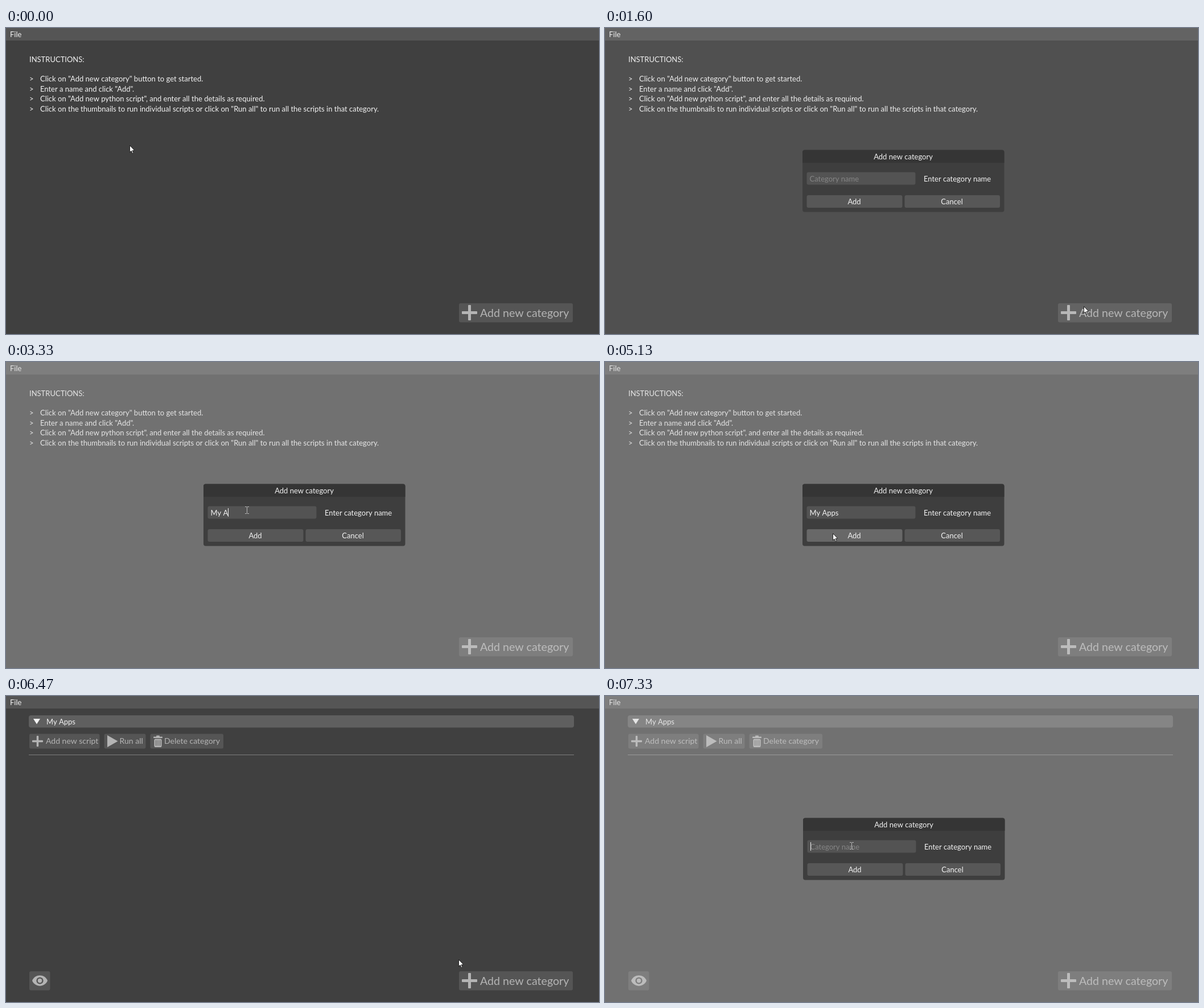
These frames come from a looping animation (1042 by 538 pixels, 8000 ms). An HTML page with a canvas:

```html
<!DOCTYPE html>
<html lang="en">
<head>
<meta charset="utf-8">
<title>Script launcher</title>
<style>
html, body { margin: 0; width: 100%; height: 100%; overflow: hidden; background: #404040; }
canvas { display: block; width: 100%; height: 100%; }
</style>
</head>
<body>
<canvas id="stage" width="1042" height="538"></canvas>
<script>
const ctx = document.getElementById('stage').getContext('2d');
const LOOP = 8000;
const FONT = 'Lato, "Open Sans", sans-serif';
const INK = '#f2f2f2', ICON = '#b4b4b4', BUTTON = '#555555';

const STEPS = [
  'Click on "Add new category" button to get started.',
  'Enter a name and click "Add".',
  'Click on "Add new python script", and enter all the details as required.',
  'Click on the thumbnails to run individual scripts or click on "Run all" to run all the scripts in that category.'
];

// Times below are in ticks of 1/15 s.
const OPEN_1 = 24, PRESS = 76, ADDED = 78, EYE = 79, OPEN_2 = 99;
const TYPED = [[43, 'M'], [45, 'My'], [47, 'My '], [50, 'My A'], [57, 'My Ap'], [59, 'My App'], [61, 'My Apps']];
const CARETS = [[33, 72], [110, 120]];

const smooth = p => p * p * (3 - 2 * p);
const easeOut = p => 1 - (1 - p) ** 2;
const linear = p => p;

// start, end, target x, target y, easing
const MOVES = [
  [0, 3, 460, 297, easeOut],
  [9, 17, 841, 489, smooth],
  [24, 29, 422, 261, smooth],
  [32, 33, 423, 260, linear],
  [68, 72, 400, 301, smooth],
  [86, 94, 862, 493, smooth],
  [96, 99, 661, 403, linear],
  [99, 109, 433, 263, easeOut]
];

function pointerAt(k) {
  let x = 217, y = 206;
  for (const [from, to, tx, ty, ease] of MOVES) {
    if (k <= from) break;
    const p = ease(Math.min(1, (k - from) / (to - from)));
    x += (tx - x) * p;
    y += (ty - y) * p;
  }
  return { x: Math.round(x), y: Math.round(y) };
}

function box(x, y, w, h, color, r = 3) {
  ctx.fillStyle = color;
  ctx.beginPath();
  ctx.roundRect(x, y, w, h, r);
  ctx.fill();
}

function poly(points, color) {
  ctx.fillStyle = color;
  ctx.beginPath();
  points.forEach(([x, y]) => ctx.lineTo(x, y));
  ctx.closePath();
  ctx.fill();
}

function label(str, x, y, { size = 13, color = INK, align = 'left', weight = 400 } = {}) {
  ctx.font = `${weight} ${size}px ${FONT}`;
  ctx.textAlign = align;
  ctx.fillStyle = color;
  ctx.fillText(str, x, y);
}

function plus(cx, cy, size, thick) {
  box(cx - size / 2, cy - thick / 2, size, thick, ICON, 1);
  box(cx - thick / 2, cy - size / 2, thick, size, ICON, 1);
}

function trash(x, y) {
  box(x + 5, y, 6, 3, ICON, 1);
  box(x, y + 2, 16, 2.5, ICON, 1);
  box(x + 1.5, y + 6, 13, 14.5, ICON, 2);
  for (let i = 0; i < 3; i++) box(x + 4 + i * 3.5, y + 8, 1.2, 10, BUTTON, 0);
}

function eye(cx, cy) {
  ctx.fillStyle = ICON;
  ctx.beginPath();
  ctx.moveTo(cx - 13.5, cy);
  ctx.bezierCurveTo(cx - 8.5, cy - 12.2, cx + 8.5, cy - 12.2, cx + 13.5, cy);
  ctx.bezierCurveTo(cx + 8.5, cy + 12.2, cx - 8.5, cy + 12.2, cx - 13.5, cy);
  ctx.fill();
  for (const [r, color] of [[6.1, BUTTON], [3.7, ICON]]) {
    ctx.fillStyle = color;
    ctx.beginPath();
    ctx.arc(cx, cy, r, 0, 7);
    ctx.fill();
  }
}

function instructions() {
  label('INSTRUCTIONS:', 41, 60);
  STEPS.forEach((line, i) => {
    const y = Math.round(94 + i * 17.6);
    label('>', 41, y);
    label(line, 60, y);
  });
}

function category() {
  const style = { size: 14, color: ICON };
  box(40, 34, 958, 21.5, '#5f5f5f', 4);
  poly([[48, 40], [60, 40], [54, 49.5]], INK);
  label('My Apps', 71, 50);
  box(41, 66.5, 123.5, 26, BUTTON);
  plus(55.5, 79.5, 19, 3.5);
  label('Add new script', 70, 84, style);
  box(172.5, 66.5, 73, 26, BUTTON);
  poly([[178, 69], [196.5, 79.5], [178, 90]], ICON);
  label('Run all', 199.5, 84, style);
  box(253.5, 66.5, 128.5, 26, BUTTON);
  trash(259, 69.5);
  label('Delete category', 278, 84, style);
  box(40, 103, 958, 1, '#7d7d7d', 0);
}

function dialog(left, text, caret, pressed) {
  ctx.save();
  ctx.translate(left, 0);
  box(0, 214.5, 354.5, 109, '#3e3e3e', 4);
  box(0, 214.5, 354.5, 22.5, '#353535', [4, 4, 0, 0]);
  label('Add new category', 177, 231, { align: 'center' });
  box(7.5, 253.5, 191, 22, '#535353');
  label(text || 'Category name', 12.5, 270, { color: text ? INK : '#858585' });
  if (caret) box(13 + Math.floor(ctx.measureText(text).width), 257, 1, 15, INK, 0);
  label('Enter category name', 213, 270);
  box(7.5, 294, 168, 22, pressed ? '#686868' : '#575757');
  label('Add', 91, 310, { align: 'center' });
  box(179.5, 294, 167.5, 22, '#575757');
  label('Cancel', 262.5, 310, { align: 'center' });
  ctx.restore();
}

function arrow(x, y) {
  ctx.save();
  ctx.translate(x, y);
  const shape = [[0.5, 0.5], [0.5, 12.5], [3.2, 10], [5.2, 14.6], [7, 13.8], [5.1, 9.4], [8.8, 9.2]];
  poly(shape, '#ffffff');
  ctx.strokeStyle = '#151515';
  ctx.lineWidth = 0.9;
  ctx.stroke();
  ctx.restore();
}

function beam(x, y) {
  const color = '#b8b8b8';
  box(x, y - 5, 1, 11, color, 0);
  for (const dy of [-6, 6]) {
    box(x - 3, y + dy, 3, 1, color, 0);
    box(x + 1, y + dy, 3, 1, color, 0);
  }
}

function draw(ms) {
  const k = Math.floor((ms + 5) * 0.015);
  const added = k >= ADDED;
  const first = k >= OPEN_1 && !added;
  const open = first || k >= OPEN_2;

  box(0, 0, 1042, 538, '#404040', 0);
  box(0, 0, 1042, 22, '#555555', 0);
  label('File', 7, 16);
  if (added) category(); else instructions();
  if (k >= EYE) {
    box(41, 484, 36.5, 33.5, BUTTON);
    eye(59.5, 500.5);
  }
  box(796, 484, 200, 33.5, BUTTON);
  plus(814.5, 500.5, 27, 5);
  label('Add new category', 833, 507.5, { size: 19.6, color: ICON });

  if (open) {
    const fade = first ? 0.31 + (k - OPEN_1) * 0.4 : 0.41 + (k - OPEN_2) * 0.4;
    box(0, 0, 1042, 538, `rgba(204,204,204,${0.35 * Math.min(1, fade)})`, 0);
    const text = first ? TYPED.reduce((s, [at, str]) => k >= at ? str : s, '') : '';
    const caret = CARETS.some(([on, off]) => k >= on && k < off);
    dialog(first ? 347 : 348, text, caret, first && k >= PRESS);
  }

  const { x, y } = pointerAt(k);
  const overInput = open && x > 354 && x < 546 && y > 253 && y < 276;
  (overInput ? beam : arrow)(x, y);
}

function tick(now) {
  draw(now % LOOP);
  requestAnimationFrame(tick);
}
requestAnimationFrame(tick);
</script>
</body>
</html>
```
